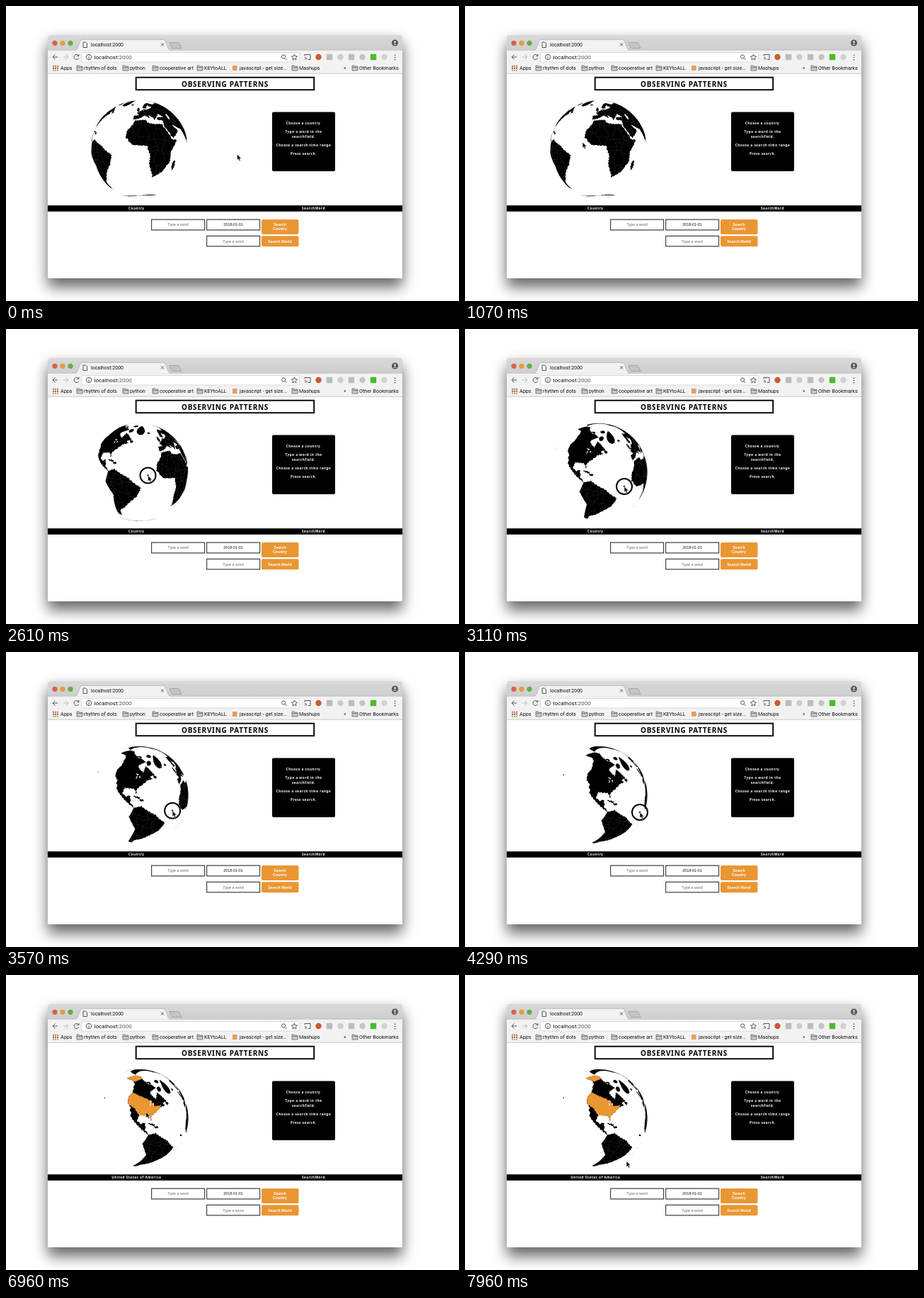
These frames come from a looping animation (640 by 416 pixels, 8 s). An HTML page:

```html
<!DOCTYPE html>
<html>
<head>
<meta charset="utf-8">
<style>
html, body { margin: 0; width: 100%; height: 100%; overflow: hidden; background: #fff; }
#window { position: absolute; left: 59px; top: 41px; width: 501px; height: 343px; border-radius: 4px 4px 1px 1px; background: #fff; box-shadow: 0 13px 20px rgba(0,0,0,.56), 0 2px 18px rgba(0,0,0,.1); }
svg { position: absolute; left: 0; top: 0; display: block; }
text { font-family: Roboto, sans-serif; font-size: 7.2px; fill: #111; }
.page text { font: 600 4.7px "Noto Sans", sans-serif; letter-spacing: .5px; fill: #fff; text-anchor: middle; }
.page .title { font-size: 10px; letter-spacing: .7px; fill: #000; }
.form text { font: 5.4px "Liberation Sans", Arial, sans-serif; letter-spacing: 0; fill: #666; }
.form .button { font-weight: bold; font-size: 5.2px; fill: #fff; }
.icon { fill: none; stroke: #555; stroke-width: 1; }
</style>
</head>
<body>
<div id="window"></div>
<svg width="640" height="416" viewBox="0 0 640 416">
  <defs>
    <linearGradient id="strip" x2="0" y2="1"><stop stop-color="#d9d9d9"/><stop offset="1" stop-color="#cecece"/></linearGradient>
    <path id="folder" d="M.5 1h3l1 1.200h4V8h-8zM.5 3.600h8" fill="#c9c9c9" stroke="#666" stroke-width=".8"/>
    <clipPath id="onLand"><use href="#land"/></clipPath>
  </defs>

  <!-- browser frame -->
  <path d="M59 62V45q0-4 4-4H556q4 0 4 4V62z" fill="url(#strip)"/>
  <path d="M59 62H560V95H59z" fill="#f2f2f2"/>
  <path d="M59 62.300H560M59 95.300H560" stroke="#b5b5b5" stroke-width=".7"/>
  <circle cx="69" cy="52.300" r="3.600" fill="#d9614a"/>
  <circle cx="80" cy="52.300" r="3.600" fill="#e59c3c"/>
  <circle cx="91" cy="52.300" r="3.600" fill="#67ad45"/>
  <path d="M98 62.800q2-.5 3-3l4-10q1-2 3-2H222q2 0 3 2l4 10q1 2.500 4 3z" fill="#f2f2f2"/>
  <path d="M98 62.300q2-.5 3-3l4-10q1-2 3-2H222q2 0 3 2l4 10q1 2.500 4 3" fill="none" stroke="#aaa" stroke-width=".6"/>
  <path d="M231 51.500h12q1.500 0 2 1.500l3 6.500h-12.500q-1.500 0-2-1.500z" fill="#c4c4c4" stroke="#999" stroke-width=".7"/>
  <path d="M109 51h3.500l2 2v5.500H109zM219 52.500l4 4m0-4l-4 4" class="icon"/>
  <circle cx="549.500" cy="52" r="4.500" fill="#555"/>
  <path d="M547 54.500q2.500-3 5 0M548 50.800a1.500 1.500 0 0 1 3 0a1.500 1.500 0 0 1-3 0" fill="#ddd"/>
  <text x="120" y="57" style="font-size:7px">localhost:2000</text>

  <rect x="106.500" y="65.500" width="308" height="13.500" rx="2" fill="#fff" stroke="#ccc" stroke-width=".7"/>
  <path d="M73 72h-7m3.500-3.500L66 72l3.500 3.500M102.500 70a3.500 3.500 0 1 0 .3 3.500M103 68v2.500h-2.500M117 71.500v3M117 69.500v1" class="icon"/>
  <path d="M81 72h7m-3.500-3.500L88 72l-3.500 3.500" class="icon" style="stroke:#bbb"/>
  <circle cx="117" cy="72" r="3.700" class="icon"/>
  <text x="124.500" y="75" style="font-size:8.100px">localhost:<tspan fill="#555">2000</tspan></text>
  <path d="M389.500 71.500a2.600 2.600 0 0 1 5.200 0a2.600 2.600 0 0 1-5.200 0M394 73.500l2.500 2.500M407.500 68l1.200 2.800 3 .3-2.300 2 .7 3-2.600-1.600-2.600 1.600.7-3-2.300-2 3-.3z" class="icon"/>
  <path d="M422 70.500v-2h8v7h-3M422 72.500q3 0 3 3M422 74.500q1 0 1 1" class="icon"/>
  <g id="extensions"></g>
  <path d="M549.500 68.500v8" stroke="#555" stroke-width="1.500" stroke-dasharray="1.500 1.700"/>
  <path d="M66 84.800h8" stroke="#e0604f" stroke-width="2" stroke-dasharray="2 1"/>
  <path d="M66 87.800h8" stroke="#666" stroke-width="2" stroke-dasharray="2 1"/>
  <path d="M66 90.800h8" stroke="#d99a3c" stroke-width="2" stroke-dasharray="2 1"/>
  <rect x="320" y="84" width="6.500" height="7" fill="#e0a060"/>
  <g id="bookmarks"></g>

  <!-- page -->
  <g class="page">
    <rect x="183.700" y="100.700" width="251.500" height="17.500" fill="none" stroke="#000" stroke-width="1.900"/>
    <text class="title" x="309.500" y="113.700">OBSERVING PATTERNS</text>
    <rect x="376" y="149.500" width="89" height="83.500" rx="2"/>
    <text x="420" y="167.400">Choose a country</text>
    <text x="420.500" y="179.400">Type a word in the</text>
    <text x="420.500" y="185.800">searchfield.</text>
    <text x="420.500" y="197.800">Choose a search time range</text>
    <text x="420.500" y="209.800">Press search.</text>
    <rect x="59" y="281.200" width="501" height="8.600"/>
    <text id="country" x="184.300" y="287.200"></text>
    <text x="434.500" y="287.200">SearchWord</text>
    <g class="form">
      <path d="M205.600 301.200h75v14.600h-75zM283.600 301.200h75v14.600h-75zM283.600 324.300h75v14.600h-75z" fill="#fff" stroke="#444" stroke-width="1.200"/>
      <rect x="361" y="301" width="52.500" height="21" rx="2" fill="#ea9633"/>
      <rect x="361" y="324.300" width="52.500" height="15" rx="2" fill="#ea9633"/>
      <text x="243" y="310.300">Type a word</text>
      <text x="321" y="310.300" style="fill:#111">2018-01-01</text>
      <text x="321" y="333.600">Type a word</text>
      <text class="button" x="387" y="310">Search</text>
      <text class="button" x="387" y="316.400">Country</text>
      <text class="button" x="387" y="333.700">Search World</text>
    </g>
  </g>

  <path id="land"/>
  <path id="borders" fill="none" stroke="#3c3c3c" stroke-width=".4" clip-path="url(#onLand)"/>
  <path id="usa"/>
  <path id="lakes" fill="#fff"/>
  <circle id="mark" r="1.300"/>
  <circle id="hover" cx="194.500" cy="147" r="1.100" fill="#d8683a"/>
  <circle id="ring" r="11" fill="none" stroke="#000" stroke-width="2"/>
  <path id="cursor" d="M0 0V8.300L1.900 6.600 3.200 9.700 4.800 9 3.500 6.100H6z" stroke="#fff" stroke-width=".6"/>
</svg>

<script>
const $ = id => document.getElementById(id);

$('extensions').innerHTML = ['#cb5a30', '#bbb', '#ccc', '#bdbdbd', '#c4c4c4', '#4bbb2c', '#d2d2d2'].map((color, i) =>
  `<rect x="${437.3 + i * 15.5}" y="67.800" width="8.400" height="8.400" rx="${i % 2 ? 1 : 4.2}" fill="${color}"/>`).join('');

const bookmarks = [[77, 'Apps'], [110, 'rhythm of dots'], [175, 'python'], [217, 'cooperative art'], [280, 'KEYtoALL'],
  [330, 'javascript - get size...'], [414, 'Mashups'], [477, '»'], [499, 'Other Bookmarks']];
$('bookmarks').innerHTML = bookmarks.map(([x, label], i) =>
  (i % 7 && i !== 5 ? `<use href="#folder" x="${x - 10.5}" y="83"/>` : '') + `<text x="${x}" y="90">${label}</text>`).join('');

const CX = 188.5, CY = 202, R = 69, LOOP = 8000;
const clamp = u => Math.max(0, Math.min(1, u));
const mix = (a, b, u) => a + (b - a) * u;
const range = (from, to, step) => Array.from({ length: Math.floor((to - from) / step) + 1 }, (_, i) => from + i * step);

function toSphere(lon, lat) {
  const l = lon * Math.PI / 180, p = lat * Math.PI / 180;
  return [Math.cos(p) * Math.sin(l), Math.sin(p), Math.cos(p) * Math.cos(l)];
}

// Joins key points (longitude, latitude) with a ragged coast
function coast(keys) {
  const points = [], n = keys.length;
  for (let i = 0; i < n; i += 2) {
    const [x, y, x2, y2] = [0, 1, 2, 3].map(k => keys[(i + k) % n]);
    const steps = Math.ceil(Math.hypot(x2 - x, y2 - y) / 1.5);
    for (let s = 0; s < steps; s++) {
      const lon = mix(x, x2, s / steps), lat = mix(y, y2, s / steps);
      points.push(toSphere(lon + .7 * Math.sin(lat * 1.9 + lon), lat + .6 * Math.sin(lon * 1.6)));
    }
  }
  return points;
}

const blob = ([lon, lat, w, h]) => coast(range(0, 11, 1).flatMap(i =>
  [lon + w * Math.cos(i * Math.PI / 6), lat + h * Math.sin(i * Math.PI / 6)]));

const northAmerica = [-168,66, -156,71, -128,70, -96,70, -82,68, -94,60, -92,57, -82,53, -79,52, -78,61, -69,59, -56,52, -66,49,
  -61,46, -70,43, -76,36, -81,31, -80,25, -84,30, -97,28, -97,20, -91,18, -87,21, -83,12, -78,8, -92,14, -105,20, -113,31,
  -120,34, -124,42, -124,48, -135,58, -148,60, -164,55];
const southAmerica = [-78,8, -70,12, -51,4, -35,-7, -39,-18, -48,-27, -57,-37, -65,-42, -68,-54, -74,-51, -70,-20, -81,-5];
const africa = [-6,36, 10,37, 11,33, 20,31, 32,31, 43,12, 51,11, 40,-3, 40,-15, 35,-21, 32,-27, 19,-35, 12,-18, 13,-8, 9,4,
  -8,5, -17,14, -16,22, -10,29];
const eurasia = [-9,37, -9,43, -1,44, -4,48, 9,55, 12,54, 22,56, 29,60, 22,61, 24,65, 17,61, 14,56, 6,58, 14,67, 26,71, 40,66,
  75,72, 105,77, 140,72, 188,66, 162,58, 142,58, 128,40, 120,26, 107,12, 88,21, 78,8, 68,24, 50,30, 58,22, 45,13, 35,28, 36,36,
  27,37, 29,41, 41,41, 33,46, 28,42, 23,37, 19,42, 13,45, 17,39, 9,44, 0,39];
const states = [-124,48, -95,49, -83,46, -79,43, -68,46, -70,42, -76,36, -81,31, -80,25, -84,30, -97,27, -106,32, -118,33, -124,41];
const alaska = [-141,70, -156,71, -168,66, -164,55, -148,60, -141,60];
const antarctica = range(-180, 176, 4).flatMap(lon => [lon, -71 + 3 * Math.sin(lon / 25)]);

// Centre and half size: Greenland, Arctic, North Atlantic, Caribbean, Hawaii, Madagascar
const islands = [[-42,72,14,11], [-72,67,7,4], [-80,79,14,3], [-110,71,7,2], [-19,65,4,1.5], [-2,54,2.5,4], [-56,49,3,2],
  [-78,21,5,1], [-71,19,3,1], [-156,20,1,1], [47,-19,2.5,6]];
const inlandWater = [[-88,47.5,3,.8], [-87,44,.8,2], [-82,45,1.3,1], [51,42,2.5,4.5]];

const shapes = {
  land: [...[northAmerica, southAmerica, africa, eurasia, antarctica].map(coast), ...islands.map(blob)],
  usa: [states, alaska].map(coast),
  lakes: inlandWater.map(blob),
};

// Wavy meridians with staggered cross lines stand for country borders
const meridian = (lon, lat) => lon + 2.5 * Math.sin(lat / 4 + lon);
const borderLines = range(-80, 60, 10).flatMap(lon => [
  range(-54, 56, 2).map(lat => toSphere(meridian(lon, lat), lat)),
  ...range(-50, 50, 11).map(row => {
    const lat = row + 5 * Math.sin(lon * 7 + row);
    return range(0, 1, .25).map(u => toSphere(mix(meridian(lon, lat), meridian(lon + 10, lat), u), lat + Math.sin(u * 9)));
  }),
]);

const dot = (a, b) => a[0] * b[0] + a[1] * b[1] + a[2] * b[2];
const cross = (a, b) => [a[1] * b[2] - a[2] * b[1], a[2] * b[0] - a[0] * b[2], a[0] * b[1] - a[1] * b[0]];

function grab([x, y]) {
  const u = (x - CX) / R, v = (CY - y) / R;
  return [u, v, Math.sqrt(Math.max(0, 1 - u * u - v * v))];
}

// Shortest rotation that carries direction a to direction b
function rotation(a, b) {
  const c = dot(a, b), w = cross(a, b);
  return v => {
    const k = dot(w, v) / (1 + c), q = cross(w, v);
    return v.map((n, i) => n * c + q[i] + w[i] * k);
  };
}

const place = (x, y) => (CX + R * x).toFixed(2) + ' ' + (CY - R * y).toFixed(2);

// Hidden points slide out to the rim
function fillPath(points, turn) {
  const turned = points.map(turn);
  if (turned.every(p => p[2] < 0)) return '';
  return 'M' + turned.map(([x, y, z]) => {
    const s = z < 0 ? Math.hypot(x, y) : 1;
    return place(x / s, y / s);
  }).join('L') + 'Z';
}

function linePath(points, turn) {
  let pen = 'M';
  return points.map(turn).map(([x, y, z]) => {
    if (z < 0) { pen = 'M'; return ''; }
    const step = pen + place(x, y);
    pen = 'L';
    return step;
  }).join('');
}

const DRAG = 1890, DROP = 4110, CLICK = 5750;
const start = [157, 192];
const path = [[0, 326.5, 209], [290, 326.5, 209], [1070, 166, 192], [2070, 166, 192], [2610, 200.5, 206.5], [3110, 225, 222],
  [DROP, 247, 226], [4330, 247, 226], [5070, 195, 188], [6790, 195, 188], [7570, 217, 230], [7960, 228, 262.5], [LOOP, 228, 262.5]];

function pointer(t) {
  const i = path.findIndex(k => k[0] > t);
  const [t0, x0, y0] = path[i - 1], [t1, x1, y1] = path[i];
  let u = (t - t0) / (t1 - t0);
  if (t < DRAG || t > DROP) u = u * u * (3 - 2 * u);
  return [mix(x0, x1, u), mix(y0, y1, u)];
}

function draw() {
  const t = performance.now() % LOOP;
  const at = pointer(t), held = pointer(Math.max(DRAG, Math.min(t, DROP)));
  const pull = clamp((t - DRAG) / 100);
  const anchor = start.map((n, i) => mix(n, held[i], pull));
  const turn = rotation(grab(start), grab(anchor));

  for (const id in shapes) $(id).setAttribute('d', shapes[id].map(s => fillPath(s, turn)).join(''));
  $('borders').setAttribute('d', borderLines.map(s => linePath(s, turn)).join(''));

  const glow = 1 - (1 - clamp((t - CLICK) / 750)) ** 1.8;
  $('usa').setAttribute('fill', `rgb(${[234, 150, 51].map(n => Math.round(n * glow))})`);
  $('country').textContent = t < CLICK ? 'Country' : 'United States of America';
  $('hover').setAttribute('opacity', +(t < 1110));
  $('mark').setAttribute('opacity', +(t >= DRAG));
  $('mark').setAttribute('transform', `translate(${anchor})`);
  $('ring').setAttribute('opacity', clamp((t - 1100) / 180) * clamp((4450 - t) / 150));
  $('ring').setAttribute('transform', `translate(${at})`);
  $('cursor').setAttribute('transform', `translate(${at})`);
  requestAnimationFrame(draw);
}
draw();
</script>
</body>
</html>
```
